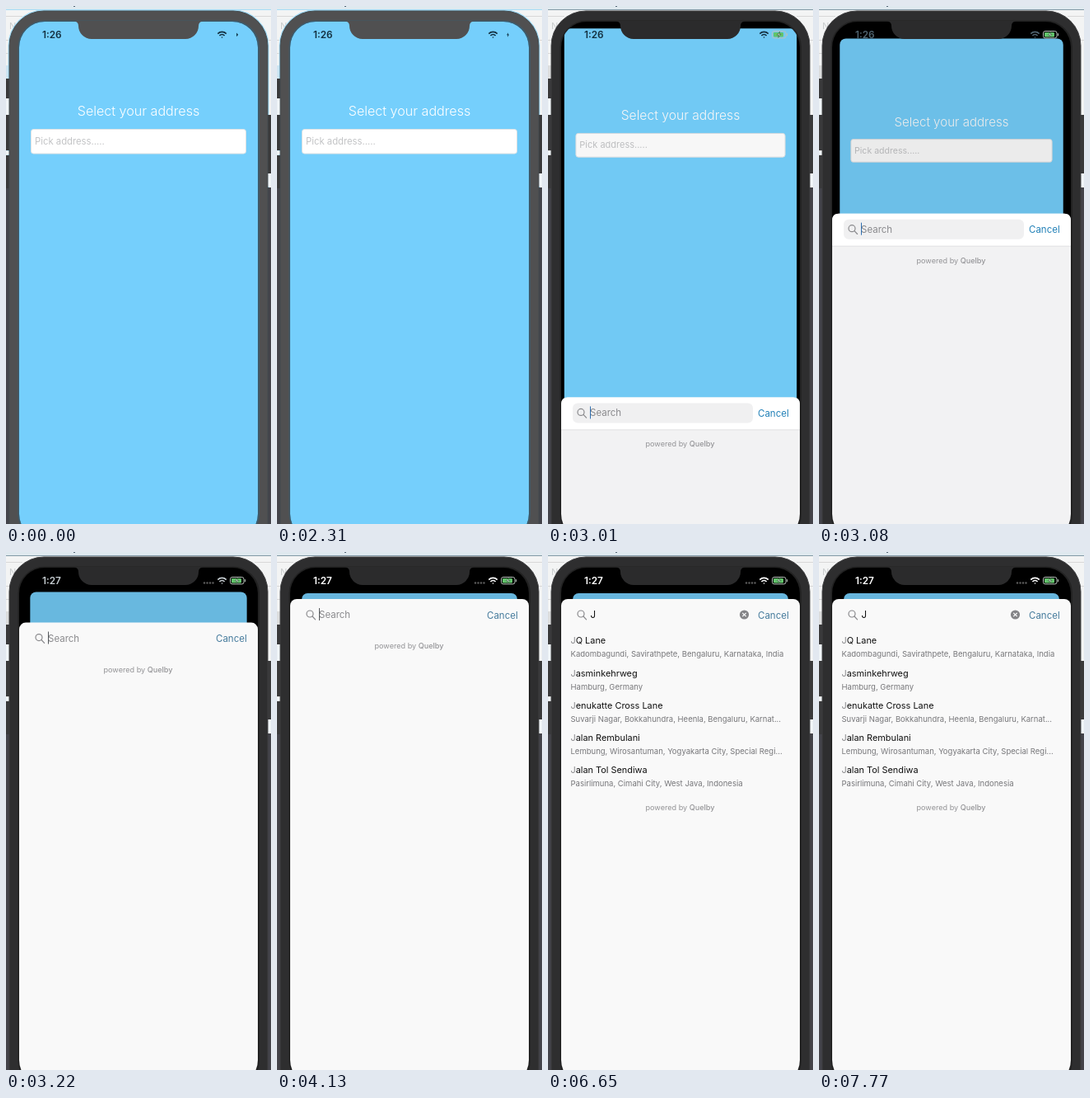
An HTML page that plays this animation: 322 by 628 pixels, repeating every 8000 ms.

```html
<!DOCTYPE html>
<html lang="en">
<head>
<meta charset="utf-8">
<title>Address picker</title>
<style>
html, body { margin: 0; width: 100%; height: 100%; overflow: hidden; background: #f3f4f4; }
svg { display: block; width: 322px; height: 628px; font-family: Inter, Roboto, sans-serif; }
text { white-space: pre; }
.body { font-size: 11.5px; }
.row { font-size: 10.9px; fill: #111; }
.sub { font-size: 9.5px; fill: #77777a; }
</style>
</head>
<body>
<svg viewBox="0 0 322 628">
  <defs>
    <clipPath id="screen"><rect x="16" y="19" width="290" height="628" rx="31"/></clipPath>
  </defs>

  <!-- desktop behind the phone -->
  <g>
    <rect width="322" height="628" fill="#f3f4f4"/>
    <rect width="322" height="4" fill="#dfe9ef"/>
    <rect id="rule" y="4" width="322" height="1"/>
    <path d="M0 12.5H20M0 41.5H8M0 57.5H5M302 12.5H322M314 41.5H322" stroke="#d8d8d8"/>
    <rect id="side" y="72" width="5" height="148"/>
    <text x="4" y="28" font-size="11" fill="#c9cccd">N</text>
    <rect id="halo" x="3.5" y="5.5" width="315" height="700" rx="42.5" fill="none" stroke="#a5dcf6" stroke-width="2"/>
    <rect y="220" width="322" height="408" fill="#43434a"/>
    <path d="M0 88h5v24h-5zM0 132h5v43h-5zM0 181h5v40h-5zM317 132h5v71h-5z" fill="#39393a"/>
    <path d="M0 112h4v20h-4zM0 176h4v4h-4zM318 203h4v16h-4z" fill="#f0f5f8"/>
    <rect x="82" width="2" height="1" fill="#567"/>
  </g>

  <rect id="bezel" x="4" y="6" width="314" height="700" rx="42"/>
  <rect id="rim" x="15.5" y="18.5" width="291.5" height="629" rx="31.5" fill="none" stroke-width="2"/>

  <g clip-path="url(#screen)">
    <rect x="16" y="19" width="290" height="640" fill="#000"/>
    <g id="view">
      <rect x="16" y="19" width="290" height="680" rx="8" fill="#75cffc"/>
      <text x="161" y="133" text-anchor="middle" font-size="16.1" font-weight="300" fill="#fff">Select your address</text>
      <rect x="30.5" y="149.5" width="261" height="29.5" rx="3" fill="#fff" stroke="#dfe3e5"/>
      <text x="35" y="168" font-size="11.3" fill="#c3c4c6">Pick address.....</text>
      <rect id="dim" x="16" y="19" width="290" height="680" rx="8" opacity="0"/>
    </g>

    <g id="sheet">
      <rect id="paper" x="16" width="290" height="700" rx="8"/>
      <g id="header">
        <path d="M16 39V8q0-8 8-8H298q8 0 8 8V39z" fill="#fff"/>
        <path d="M16 39.5H306" stroke="#e2e2e4"/>
        <rect x="30" y="7" width="219" height="24" rx="6" fill="#f0f0f1"/>
      </g>
      <g fill="none" stroke="#8a8a8d" stroke-width="1.2" stroke-linecap="round">
        <circle cx="40" cy="18" r="4"/><path d="M43 21l3.6 3.8"/>
      </g>
      <text id="hint" class="body" x="51" y="23" fill="#8a8a8d">Search</text>
      <text id="cancel" class="body" x="255" y="23.5">Cancel</text>
      <g id="typed">
        <text class="body" x="51.5" y="23" fill="#111">J</text>
        <circle cx="238.5" cy="19" r="5.6" fill="#858588"/>
        <path d="M236.3 16.8l4.4 4.4m0-4.4l-4.4 4.4" stroke="#fff" stroke-width="1.2"/>
      </g>
      <rect id="caret" y="11" width="1" height="15"/>
      <g id="rows"></g>
      <text id="credit" x="160.5" text-anchor="middle" font-size="9.1" fill="#949497">powered by <tspan font-weight="500">Quelby</tspan></text>
    </g>

    <g>
      <text id="clock" x="44" y="39" font-size="11.8" font-weight="600"></text>
      <g id="dots" fill="#5c5c5c"></g>
      <g fill="none" stroke-width="1.7" class="ink">
        <path d="M257.3 33.6a7.4 7.4 0 0 1 10.4 0"/>
        <path d="M259.4 36a4.4 4.4 0 0 1 6.2 0"/>
      </g>
      <circle class="ink" cx="262.5" cy="38" r=".8"/>
      <path id="bolt" fill="#14384c"/>
      <g id="battery">
        <rect x="272.5" y="30.5" width="16.5" height="8.4" rx="2.4" fill="none" stroke="#b9c2bb"/>
        <rect x="274" y="32" width="12" height="5.4" rx="1.2" fill="#62c46b"/>
        <path d="M290.6 33.2v3" stroke="#b9c2bb"/>
        <path d="M281.6 31.2l-3.2 4h2.2l-.8 3 3.2-3.9h-2.2z" fill="#eaf6ea" stroke="#234a2a" stroke-width=".6"/>
      </g>
    </g>
  </g>
  <path id="notch" d="M82 18Q88 19 88 24A16 16 0 0 0 104 40H218A16 16 0 0 0 234 24Q234 19 240 18Z"/>
</svg>

<script>
const LOOP = 8000, STEP = 70;
const OPEN = 2953, STIFF = 0.01777;   // sheet spring
const SHADE = 2870, TYPE = 6090, LIST = 6300;

const CARET = [[0, 0], [2940, 1], [3500, .5], [3570, 0], [4060, .5], [4130, 1],
  [4620, .5], [4690, 0], [5110, .5], [5180, 1], [5670, .5], [5740, 0],
  [TYPE, 1], [6580, .5], [6650, 0], [7070, .5], [7140, 1], [7560, .5], [7630, 0]];

const RESULTS = [
  ['JQ Lane', 'Kadombagundi, Savirathpete, Bengaluru, Karnataka, India'],
  ['Jasminkehrweg', 'Hamburg, Germany'],
  ['Jenukatte Cross Lane', 'Suvarji Nagar, Bokkahundra, Heenla, Bengaluru, Karnat...'],
  ['Jalan Rembulani', 'Lembung, Wirosantuman, Yogyakarta City, Special Regi...'],
  ['Jalan Tol Sendiwa', 'Pasirlimuna, Cimahi City, West Java, Indonesia']
];

const $ = id => document.getElementById(id);
const set = (id, attrs) => {
  for (const k in attrs) $(id).setAttribute(k, attrs[k]);
};
const show = (id, on) => set(id, { opacity: +on });
const clamp = x => Math.min(1, Math.max(0, x));
const stepAt = (table, t) => table.reduce((v, [at, x]) => t >= at ? x : v, 0);

$('rows').innerHTML = RESULTS.map(([name, place], i) => {
  const y = 54.3 + i * 39.2;
  return `<text class="row" x="27.5" y="${y}"><tspan fill="#8a8a8d">J</tspan>${name.slice(1)}</text>
    <text class="sub" x="27.5" y="${y + 16}">${place}</text>`;
}).join('');
$('dots').innerHTML = [0, 1, 2, 3].map(i => `<circle cx="${241 + i * 3.5}" cy="37.5" r="1.2"/>`).join('');

function spring(t) {
  const x = Math.max(0, t - OPEN) * STIFF;
  return 1 - (1 + x) * Math.exp(-x);
}

function render(time) {
  const t = Math.floor(time / STEP) * STEP;
  const dark = t >= SHADE, late = t >= 3150, typed = t >= TYPE;
  const p = spring(t);

  set('rule', { fill: dark ? '#8299a6' : '#a5dcf6' });
  set('side', { fill: dark ? '#dcdddd' : '#cfe6f2' });
  show('halo', !dark);
  set('bezel', { fill: dark ? '#2e2e2f' : '#505051', stroke: dark ? '#3c3c3e' : '#444c50' });
  set('rim', { stroke: dark ? '#222' : '#3f5a69' });
  set('notch', { fill: dark ? '#2b2b2c' : '#505051' });

  set('view', { transform: `translate(161 ${19 + 31 * p}) scale(${1 - .097 * p}) translate(-161 -19)` });
  set('dim', { opacity: .12 * p });
  set('sheet', { transform: `translate(0 ${628 - 571 * p})` });
  set('paper', { fill: late ? '#f9f9f9' : '#f2f2f3' });
  show('header', !late);
  set('cancel', { fill: late ? '#477c9d' : '#2482b8' });

  show('hint', !typed);
  show('typed', typed);
  set('caret', { x: typed ? 58.5 : 51, opacity: stepAt(CARET, t), fill: late ? '#55595c' : '#2f6fb0' });

  const list = clamp((t - LIST + STEP) / (2 * STEP));
  set('rows', { opacity: list });
  set('credit', { y: list ? 256 : 60 });

  // status bar turns from navy to white while the sheet rises
  const w = clamp((t - 3010) / 280);
  const ink = `rgb(${[20, 48, 64].map(c => Math.round(c + (255 - c) * w))})`;
  $('clock').textContent = late ? '1:27' : '1:26';
  set('clock', { fill: ink });
  document.querySelectorAll('.ink').forEach(e => {
    e.setAttribute(e.tagName === 'g' ? 'stroke' : 'fill', ink);
  });
  show('dots', late);
  show('battery', dark);
  show('bolt', !dark);
  set('bolt', { d: t < 2170 ? 'M280 32.5l2.2 2.3-2.2 2.4z' : 'M281 32.3l-2 3h1.3l-.3 2.4 2.2-3.1h-1.3z' });
}

const start = performance.now();
(function frame() {
  render((performance.now() - start) % LOOP);
  requestAnimationFrame(frame);
})();
</script>
</body>
</html>
```
